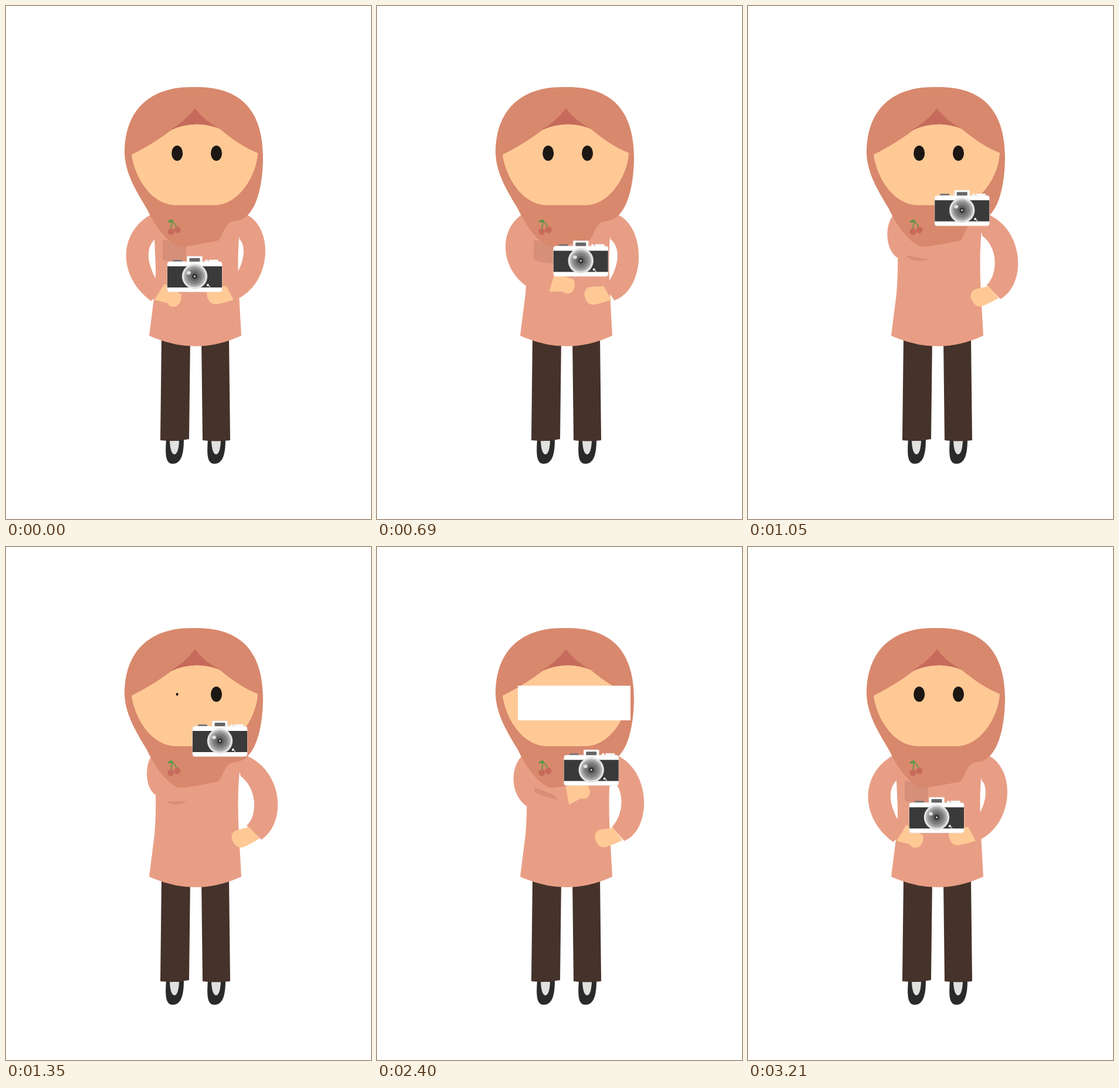
An HTML page that plays this animation: 622 px wide and 873 px high, repeating every 3750 ms.

```html
<!DOCTYPE html>
<html lang="en">
<head>
<meta charset="utf-8">
<title>Taking a photo</title>
<style>
  html, body { margin: 0; height: 100%; overflow: hidden; background: #fff; }
  svg { display: block; width: 100vw; height: 100vh; }
  .cloth { fill: #e89e85; }
  .scarf { fill: #d8886d; }
  .skin { fill: #ffc995; }
  .eye { fill: #1d1714; }
  .berry { fill: #c66b5b; }
</style>
</head>
<body>
<svg viewBox="0 0 622 873">
  <defs>
    <g id="shoe">
      <path fill="#2a2a2a" d="M273 738H303C303 764 298 779 284 779C272 779 271 764 273 738Z"/>
      <path fill="#e1e1df" d="M279 740H295Q294 762 287 763Q280 762 279 740Z"/>
    </g>
  </defs>

  <use href="#shoe"/>
  <use href="#shoe" x="71"/>
  <path fill="#45322b" d="M265 565H314L312 737Q288 742 263 739ZM333 565H380L382 739Q358 742 335 739Z"/>

  <path id="leftArm" class="cloth"/>
  <path id="gap" fill="#fff"/>
  <path id="rightArm" class="cloth"/>
  <path class="cloth" d="M262 360L254 400Q257 440 253 490L244 561Q323 597 401 561L397 490Q394 430 397 395L400 356Z"/>
  <path id="pocket" fill="#d68f79"/>
  <path id="leftHand" class="skin" d="M0 0V-32H34Q42 -20 38 -12Q32 -2 22 -7Z"/>
  <path id="rightHand" class="skin" d="M0 0L-15 -22L-38 -19Q-47 -16 -47 -6Q-43 12 -30 11Q-15 7 0 0Z"/>

  <path class="scarf" d="M320 138C250 136 202 173 202 250C203 285 222 315 240 345C253 372 270 398 292 409Q300 412 362 399C372 388 372 366 392 366C425 362 438 310 438 255C437 173 395 136 320 138Z"/>
  <path class="skin" d="M214 253Q255 232 282 211Q322 192 364 209Q400 239 429 250C427 290 396 339 355 339H290C247 339 219 290 214 253Z"/>
  <path class="berry" d="M322 174Q338 196 365 209Q322 192 278 212Q306 196 322 174Z"/>

  <path fill="none" stroke="#4f9b41" stroke-width="1.6" d="M283 366Q282 372 281 379M283 366Q289 371 291 377"/>
  <path fill="#4f9b41" d="M275 368Q279 362 285 364Q282 369 275 368Z"/>
  <circle class="berry" cx="281" cy="384" r="5.5"/>
  <circle class="berry" cx="292" cy="381" r="5.5"/>

  <path id="lids" class="eye" d="M288 239Q292 237 296 239L292 241ZM355 239Q359 237 363 239L359 241Z"/>
  <ellipse id="leftEye" class="eye" rx="9.5" ry="13"/>
  <ellipse id="rightEye" class="eye" rx="9.5" ry="13"/>
  <path id="flash" fill="#fff" d="M240 236H432V295H240Z"/>

  <g id="camera">
    <rect x="284" y="432" width="16" height="5" rx="1.5" fill="#727272"/>
    <g fill="#fff" stroke="#e6e6e6" stroke-width=".7">
      <rect x="339.5" y="432" width="4" height="5" rx="1"/>
      <rect x="345.5" y="432" width="16" height="5" rx="1"/>
      <rect x="308.5" y="426" width="26" height="13" rx="1"/>
      <rect x="275" y="435" width="93" height="51.5" rx="4"/>
    </g>
    <path fill="#3a3a3a" d="M275 443H368V479H275Z"/>
    <rect x="312.5" y="429" width="18" height="6" rx="1" fill="#666"/>
    <g id="lens"></g>
    <ellipse cx="311.5" cy="454" rx="3.5" ry="3" fill="#ddd"/>
    <circle cx="344" cy="475" r="2" fill="#fff"/>
    <circle cx="347" cy="477.5" r="1" fill="#fff"/>
  </g>
</svg>
<script>
const LOOP = 3750, STEP = 30;
const $ = id => document.getElementById(id);

$('lens').innerHTML = [[21.7, '#e3e3e3'], [18.3, '#b1b1b1'], [15.5, '#969696'], [12.5, '#7d7d7d'], [8.5, '#666'], [4.5, '#333'], [1.5, '#ddd']]
  .map(([r, fill]) => `<circle cx="321.5" cy="460" r="${r}" fill="${fill}"/>`).join('');

// Poses at these amounts of lift, from resting to fully raised
const LIFTS = [0, 0.2, 0.48, 1];
const poses = {
  leftArm: [
    'M250 353C190 385 190 460 247 502L268 484L262 353Z',
    'M250 353C207 378 207 445 256 479L268 470L262 353Z',
    'M250 353C223 372 221 425 256 449L262 440L262 353Z',
    'M250 353C236 368 236 410 255 422L262 416L262 353Z'],
  gap: [
    'M253 397Q231 420 256 466Z',
    'M256 405Q255 412 256 422Z',
    'M257 405Q257 412 257 422Z',
    'M257 405Q257 412 257 422Z'],
  rightArm: [
    'M408 354C456 375 456 472 390 501L376 477C405 450 412 410 398 397L390 354Z',
    'M408 354C460 375 458 482 404 501L388 478C412 448 417 412 398 397L390 354Z',
    'M408 354C466 380 465 485 416 501L397 477C415 458 424 415 398 395L390 354Z',
    'M408 354C474 382 478 470 435 498L410 474C426 462 432 415 400 390L390 354Z'],
  pocket: [
    'M267 398L307 405L307 437Q285 437 267 432Z',
    'M267 398L307 405L307 437Q285 441 267 432Z',
    'M267 400L307 418L307 430Q287 420 267 411Z',
    'M272 433L290 433L308 432Q290 444 272 433Z'],
  leftHand: [
    'translate(253 500) rotate(32)', 'translate(292 487) rotate(18)',
    'translate(328 459) rotate(-8)', 'translate(325 385) rotate(-15)'],
  rightHand: [
    'translate(388 500) rotate(6)', 'translate(399 500) rotate(5)',
    'translate(413 500) rotate(0)', 'translate(432 496) rotate(-8)'],
  camera: ['translate(0 0)', 'translate(25 -25)', 'translate(44 -62)', 'translate(43 -130)']
};

const ramp = (t, from, to) => Math.min(1, Math.max(0, (t - from) / (to - from)));
const ease = x => x * x * (3 - 2 * x);
const blink = (t, middle, half) => Math.max(0.25, Math.min(1, Math.abs(t - middle) / half));

function blend(keys, lift) {
  const i = lift < LIFTS[1] ? 0 : lift < LIFTS[2] ? 1 : 2;
  const k = ramp(lift, LIFTS[i], LIFTS[i + 1]);
  const next = keys[i + 1].match(/-?\d+/g);
  let n = 0;
  return keys[i].replace(/-?\d+/g, v => (+v + (next[n++] - v) * k).toFixed(2));
}

function setEye(id, x, scale) {
  $(id).setAttribute('transform', `translate(${x} 250.5) scale(${scale})`);
}

function draw(t) {
  const lift = ease(ramp(t, 465, 1225)) - ease(ramp(t, 2100, 2820));
  for (const id in poses) {
    const value = blend(poses[id], lift);
    $(id).setAttribute(value[0] === 'M' ? 'd' : 'transform', value);
  }
  const open = Math.min(blink(t, 840, 90), blink(t, 2865, 75), blink(t, 3120, 90));
  const wink = 1 - 0.8 * (ramp(t, 1230, 1350) - ramp(t, 1980, 2100));
  setEye('leftEye', 291.7, Math.min(open, wink));
  setEye('rightEye', 358.5, open);
  $('lids').style.display = open < 0.3 ? '' : 'none';
  $('flash').style.display = t >= 2100 && t < 2820 ? '' : 'none';
}

const start = performance.now();
function tick() {
  const t = (performance.now() - start) % LOOP;
  draw(Math.floor(t / STEP) * STEP);
  requestAnimationFrame(tick);
}
tick();
</script>
</body>
</html>
```
